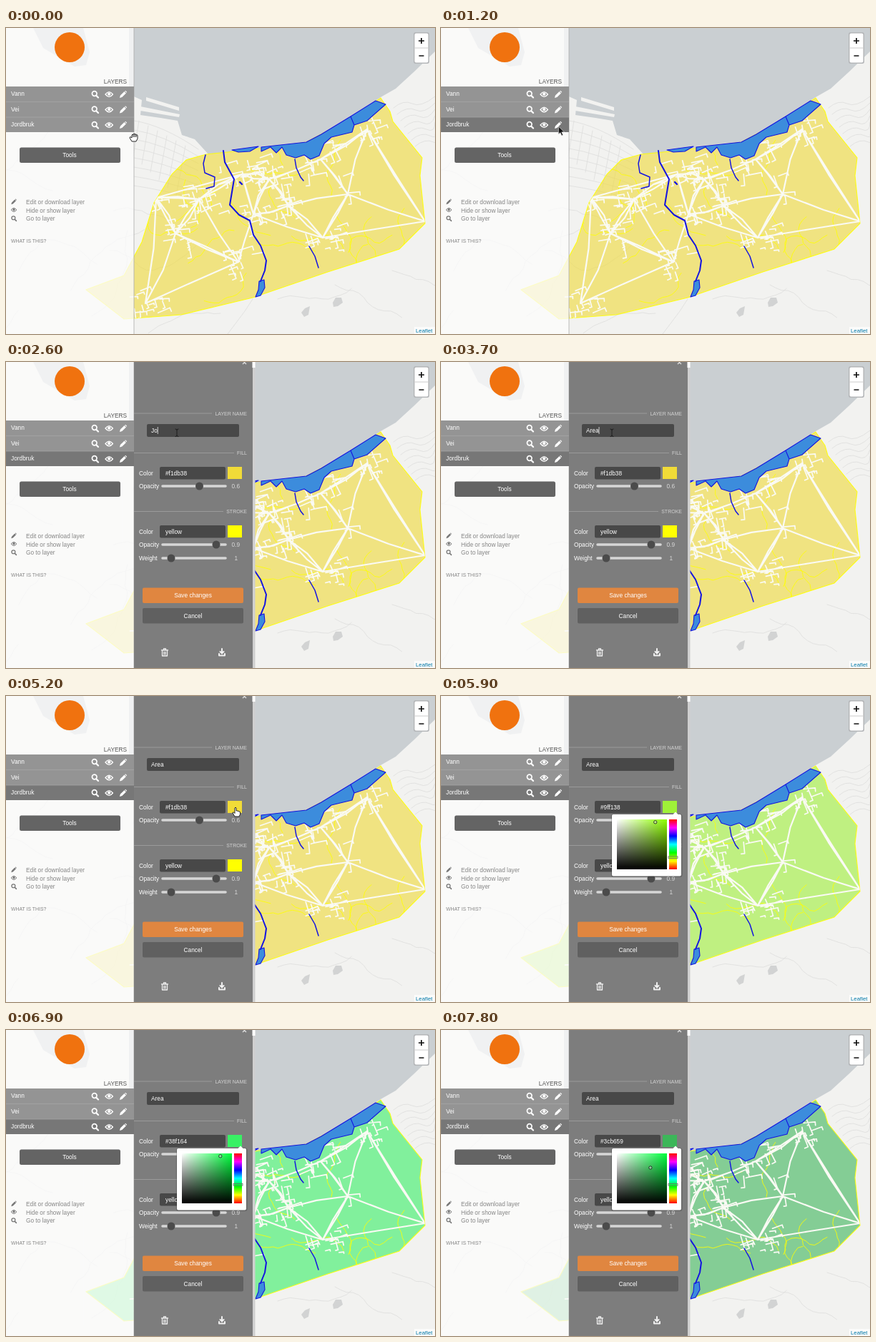
An HTML page for the animation above (8 s loop, 600 px wide and 429 px high).

```html
<!DOCTYPE html>
<html lang="en">
<head>
<meta charset="utf-8">
<title>Layer editor</title>
<style>
  html, body { margin: 0; width: 100%; height: 100%; overflow: hidden; background: #f2f2f0; }
  svg { display: block; width: 600px; height: 429px; font: 8.3px "Liberation Sans", Arial, sans-serif; }
  .line { fill: none; stroke-linejoin: round; stroke-linecap: round; }
  .white { fill: #fff; color: #fff; }
  .mid { text-anchor: middle; }
  .head { fill: #d2d2d2; font-size: 7px; text-anchor: end; }
  .field { fill: #484848; }
  .track { stroke: #d6d6d6; stroke-width: 3.6; stroke-linecap: round; }
  .knob { fill: #4b4b4b; }
  .cursor { fill: #fff; stroke: #111; stroke-width: .9; stroke-linejoin: round; }
  #arrow { fill: #111; stroke: #eee; stroke-width: .6; }
</style>
</head>
<body>
<svg viewBox="0 0 600 429">
  <defs>
    <g id="search" fill="none" stroke="currentColor" stroke-linecap="round">
      <circle cx="-.8" cy="-1" r="3.3" stroke-width="1.7"/><path d="M2 2 4.5 4.5" stroke-width="2.2"/>
    </g>
    <g id="eye">
      <path d="M-5.2 0Q0-6.6 5.2 0Q0 6.6-5.2 0Z" fill="none" stroke="currentColor" stroke-width="1.3"/>
      <circle cy="-.4" r="2.2" fill="currentColor"/>
    </g>
    <path id="pencil" fill="currentColor" d="M-5 5-4 1.6 1.6-4 4-1.6-1.6 4ZM2.3-4.6 3.2-5.3 5.2-3.3 4.6-2.3Z"/>
    <path id="areaShape" d="M524 98 537 117 541 131 582 182 579 207 586 274 550 310 450 342 345 378 245 402 165 408 112 367 165 347 190 300 207 245 232 205 252 185 280 177 340 171 420 160 480 128Z"/>
    <clipPath id="areaClip"><use href="#areaShape"/></clipPath>
    <clipPath id="panelClip"><path d="M179 0H349V429H179Z"/></clipPath>
    <linearGradient id="sat"><stop stop-color="#fff"/><stop offset="1" stop-color="#fff" stop-opacity="0"/></linearGradient>
    <linearGradient id="val" x2="0" y2="1"><stop stop-opacity="0"/><stop offset="1"/></linearGradient>
    <linearGradient id="hues" x2="0" y2="1">
      <stop stop-color="#f00"/><stop offset=".167" stop-color="#f0f"/><stop offset=".333" stop-color="#00f"/>
      <stop offset=".5" stop-color="#0ff"/><stop offset=".667" stop-color="#0f0"/><stop offset=".833" stop-color="#ff0"/><stop offset="1" stop-color="#f00"/>
    </linearGradient>
  </defs>

  <!-- base map -->
  <path fill="#f2f2f0" d="M0 0H600V429H0Z"/>
  <g fill="#cacfd2">
    <path d="M38 0 52 28 96 54 112 52 117 34 108 0Z"/>
    <path d="M172 0V93L190 101 188 122 216 126 240 130 246 150 264 156 283 177 340 171 420 160 480 128 524 97 545 85 570 62 600 33V0Z"/>
    <path fill="#d2d3d3" d="M413 399 418 393 425 390 423 402 417 405ZM457 385 461 378 469 378 471 385 464 390 458 391Z"/>
  </g>
  <path fill="#f2f2f0" d="M196 97 242 111 242 116 196 102ZM188 110 243 121 242 125 188 116Z"/>
  <g class="line" id="base" stroke="#dededc" stroke-width=".8"></g>

  <!-- vector layers -->
  <use href="#areaShape" id="area" fill-opacity=".6" stroke="#ff0" stroke-opacity=".9" stroke-width="1.1"/>
  <g class="line" clip-path="url(#areaClip)">
    <g id="plots" stroke="#ff0" stroke-opacity=".85"></g>
    <g id="lanes" stroke="#fafaf4" stroke-width="1.7"></g>
    <g id="roads" stroke="#fafaf4" stroke-width="2.2"></g>
  </g>
  <g stroke="#1414e0" stroke-width="1.1" stroke-linejoin="round">
    <path fill="#3c8cdc" d="M316 171 353 166 341 173 325 174ZM357 167 420 160 441 149 482 124 487 136 484 146 455 153 445 162 438 179 426 184 417 178 405 182 392 178 386 167 378 175 370 167 357 173ZM482 124 517 102 531 107 505 130 487 136Z"/>
    <path fill="#3c8cdc" d="M354 355 361 353 362 364 356 375 349 377 353 367Z"/>
    <g class="line">
      <path stroke-width="2" d="M304 172 306 188 319 212 313 248 326 262 341 270 346 290 356 305 364 326 362 340 356 355"/>
      <path stroke-width="1.5" d="M279 178 276 190 278 203 292 209 291 222 280 225M404 184 406 196 412 209 416 214M424 306 432 320 437 336"/>
      <path stroke-width="2.4" d="M327 216 330 219"/>
    </g>
  </g>

  <!-- map controls -->
  <rect x="570" y="6" width="22" height="44" rx="3" fill="#b4b6b8"/>
  <rect x="571.5" y="7.5" width="19" height="41" rx="2" fill="#fff"/>
  <path d="M571.5 28H590.5" stroke="#ccc"/>
  <path d="M577 18H585M581 14V22M577.5 39H584.5" stroke="#111" stroke-width="1.7"/>
  <path fill="#fff" fill-opacity=".7" d="M571 419H600V429H571Z"/>
  <text x="573" y="427" font-size="7.8" fill="#0078a8">Leaflet</text>

  <!-- sidebar -->
  <path fill="#fdfdfd" fill-opacity=".76" d="M0 0H179V429H0Z"/>
  <path stroke="#aaa" stroke-width=".8" d="M179 0V429"/>
  <circle cx="89" cy="27" r="21" fill="#f0720f"/>
  <text x="169" y="78" text-anchor="end" fill="#555">LAYERS</text>
  <path fill="#949494" d="M0 82H179V146H0Z"/>
  <path id="hover" fill="#777" d="M0 125H179V146H0Z"/>
  <path stroke="#a8a8a8" stroke-width=".7" d="M0 103.5H179M0 125H179"/>
  <g id="rows" class="white"></g>
  <rect x="19" y="167.5" width="141" height="21.5" rx="2.5" fill="#646464"/>
  <text class="white mid" x="89" y="181">Tools</text>
  <g fill="#858585" color="#777">
    <use href="#pencil" transform="translate(11 243.5)scale(.75)"/><text x="28" y="247">Edit or download layer</text>
    <use href="#eye" transform="translate(11 255)scale(.75)"/><text x="28" y="258.5">Hide or show layer</text>
    <use href="#search" transform="translate(11 267)scale(.75)"/><text x="28" y="270">Go to layer</text>
    <text x="7" y="301" font-size="6.9">WHAT IS THIS?</text>
  </g>

  <!-- edit panel -->
  <g clip-path="url(#panelClip)">
    <g id="panel">
      <path fill="#7d7d7d" d="M179 0H345V429H179Z"/>
      <path fill="#cfcfcf" d="M345 0H348.5V429H345Z"/>
      <path fill="#fff" d="M344.5 0H348.5V8H344.5Z"/>
      <path stroke="#ddd" stroke-width="1.4" d="M331-2 336 3M336-2 331 3"/>
      <path stroke="#a2a2a2" stroke-width=".8" d="M179 72H288M179 127.5H319M179 209.5H304"/>
      <g class="head"><text x="337" y="74.5">LAYER NAME</text><text x="337" y="130">FILL</text><text x="337" y="212">STROKE</text></g>
      <g class="field">
        <rect x="197" y="87" width="129" height="18" rx="2"/>
        <rect x="215" y="147" width="92" height="17.5" rx="2"/>
        <rect x="215" y="229" width="92" height="17.5" rx="2"/>
      </g>
      <rect id="swatch" x="310" y="147" width="20" height="17"/>
      <path fill="#ff0" d="M310 229H330V246H310Z"/>
      <path class="track" d="M219 174H307M219 256H307M219 275H307"/>
      <g class="knob"><circle cx="270.5" cy="174" r="5.5"/><circle cx="294" cy="256" r="5.5"/><circle cx="231" cy="275" r="5.5"/></g>
      <g class="white">
        <text id="name" x="203" y="99"></text>
        <text x="186" y="158.5">Color</text><text id="hex" x="223" y="158.5"></text>
        <text x="186" y="177">Opacity</text>
        <text x="186" y="240.5">Color</text><text x="223" y="240.5">yellow</text>
        <text x="186" y="259">Opacity</text><text x="186" y="278">Weight</text>
      </g>
      <g fill="#d8d8d8"><text x="315.5" y="177">0.6</text><text x="315.5" y="259">0.9</text><text x="319.5" y="278">1</text></g>
      <path id="caret" stroke="#ddd" stroke-width=".9" d="M0 91V101"/>
      <rect x="191" y="316.5" width="141" height="21.5" rx="2" fill="#e08640"/>
      <rect x="191" y="345" width="141" height="21.5" rx="2" fill="#606060"/>
      <g class="white mid"><text x="261.5" y="330">Save changes</text><text x="261.5" y="358.5">Cancel</text></g>
      <g class="line" stroke="#f0f0f0" stroke-width="1.3">
        <path d="M217.5 404H226.5M220.5 403.5V402H223.5V403.5M218.5 405.5V412H225.5V405.5M221 406.5V410M223 406.5V410"/>
        <path stroke-width="2" d="M302 402V408M299.5 406 302 408.5 304.5 406M298 409V411.5H306V409"/>
      </g>
      <g id="picker">
        <rect x="238" y="165.5" width="99.5" height="88.5" rx="3" opacity=".2"/>
        <rect x="239" y="166" width="97" height="86.5" rx="2" fill="#fff"/>
        <path fill="#fff" d="M324 166.5 328 162.5 332 166.5Z"/>
        <rect id="pure" x="246" y="173" width="70" height="70"/>
        <rect x="246" y="173" width="70" height="70" fill="url(#sat)"/>
        <rect x="246" y="173" width="70" height="70" fill="url(#val)"/>
        <rect x="319" y="173" width="11" height="70" fill="url(#hues)"/>
        <g id="dot" fill="none"><circle r="2.1" stroke="#222"/><circle r="1.2" stroke="#eee" stroke-width=".6"/></g>
        <rect id="bar" x="318" width="13" height="2.5" fill="none" stroke="#666" stroke-width=".8"/>
      </g>
    </g>
  </g>

  <!-- mouse cursors, each with its hot spot at 0,0 -->
  <g id="mouse">
    <path id="grab" class="cursor" d="M-3 6-6 1Q-6-1-4 0L-3 1V-3Q-2-5-1-3V-4Q0-6 1-4V-4Q3-5 3-3Q5-4 5-2V2L3 6ZM-1-3V0M1-4V0M3-3V0"/>
    <path id="arrow" class="cursor" d="M0 0V11L2.5 8.8 4.5 13 6.3 12.2 4.4 8H8Z"/>
    <path id="beam" class="line" stroke="#1c1c1c" d="M-2-5Q0-5 0-3.5Q0-5 2-5M0-4V4M-2 5.5Q0 5.5 0 4Q0 5.5 2 5.5"/>
    <path id="point" class="cursor" d="M-1 1Q0-1 1 1V5Q2 4 3 5.5Q4 4.5 5 6Q6 5.5 6.5 7V10L5 13H-1L-4 8Q-4 6.5-2.5 7L-1 8.5Z"/>
  </g>
</svg>
<script>
const $ = id => document.getElementById(id);
const show = (id, on) => { $(id).style.display = on ? "" : "none"; };
const times = (n, make) => Array.from({ length: n }, (_, i) => make(i));
const lines = (id, paths) => { $(id).innerHTML += `<path d="${paths.join("")}"/>`; };

let seed = 11;
const rnd = () => (seed = seed * 16807 % 2147483647) / 2147483647;
const spread = r => (rnd() * 2 - 1) * r;

// A path that wanders from x, y and turns a little at each step
function wander(x, y, steps, size, bend) {
  let angle = spread(Math.PI), d = `M${x} ${y}`;
  for (let i = 0; i < steps; i++) {
    angle += spread(bend);
    d += `l${Math.cos(angle) * size} ${Math.sin(angle) * size}`;
  }
  return d;
}

// Harbour streets, contours in the east, paths elsewhere
lines("base", [
  ...times(8, i => `M179 ${130 + i * 13}q40 6 90 ${40 - i * 3}`),
  ...times(6, i => `M${186 + i * 13} ${130 + i * 7}l${-8 - i} ${50 + i * 4}`),
  ...times(7, i => `M${542 + i * 5} ${112 + i * 9}q14 -12 26 -6t${32 - i * 5} -10`),
  ...times(8, i => wander(rnd() * 170, 200 + i * 28, 14, 10, .5)),
  ...times(4, i => wander(300 + i * 80, 400 - i * 20, 12, 9, .5)),
  "M345 380 334 397 310 429"
]);

// Field borders
lines("plots", times(22, i => wander(200 + i * 17 % 370, 215 + spread(85) + i % 5 * 22, 12, 7, .7)));

// Towns: x, y, reach of their side streets
const towns = [[210, 238, 8], [270, 240, 30], [330, 205, 34], [368, 212, 28], [325, 328, 24], [237, 288, 24], [195, 386, 24],
  [346, 261, 20], [395, 249, 20], [440, 184, 32], [478, 233, 5], [443, 294, 26], [505, 142, 24], [586, 271, 1]];
const far = (a, b) => Math.hypot(a[0] - b[0], a[1] - b[1]);

// Each town has a road to its three nearest neighbours
lines("roads", towns.flatMap(a => [...towns].sort((b, c) => far(a, b) - far(a, c)).slice(1, 4).map(b =>
  `M${a[0]} ${a[1]}L${(a[0] + b[0]) / 2 + spread(5)} ${(a[1] + b[1]) / 2 + spread(5)} ${b[0]} ${b[1]}`)));

lines("lanes", towns.flatMap(([x, y, reach]) => times(reach * .65, () => {
  const turn = (rnd() < .55 ? -.45 : 1.1) + rnd() * .4, size = 6 + rnd() * 13;
  const dx = Math.cos(turn) * size, dy = Math.sin(turn) * size;
  return `M${x + spread(reach)} ${y + spread(reach * .75)}l${dx} ${dy}l${-dy * .3} ${dx * .3}`;
})));

$("rows").innerHTML = ["Vann", "Vei", "Jordbruk"].map((label, i) => {
  const y = 93 + i * 21.5;
  const icons = ["search", "eye", "pencil"].map((id, k) => `<use href="#${id}" x="${124.5 + k * 19.7}" y="${y}"/>`);
  return `<text x="7" y="${y + 2}">${label}</text>${icons.join("")}`;
}).join("");

const ease = (t, from, to) => {
  const u = Math.min(1, Math.max(0, (t - from) / (to - from)));
  return u * u * (3 - 2 * u);
};

function toHex(h, s, v) {
  const part = n => {
    const k = (n + h / 60) % 6;
    return Math.round(255 * v * (1 - s * Math.max(0, Math.min(k, 4 - k, 1)))).toString(16).padStart(2, "0");
  };
  return "#" + part(5) + part(3) + part(1);
}

function nameAt(t) {
  if (t < 2800) return "Jordbruk".slice(0, 8 - Math.max(0, Math.floor((t - 2300) / 50)));
  return "Area".slice(0, Math.floor((t - 2700) / 150));
}

// Stops of the mouse: start and end of the move, target
const moves = [[600, 1300, 163.5, 137], [1700, 2200, 239, 99], [4300, 5000, 321, 156], [5400, 5600, 325, 232]];
const cursors = [[0, "grab"], [1000, "arrow"], [2200, "beam"], [4500, "arrow"], [4900, "point"], [5500, "arrow"], [5700, ""]];

function mouseAt(t) {
  return moves.reduce(([x, y], [from, to, tx, ty]) => {
    const e = ease(t, from, to);
    return [x + (tx - x) * e, y + (ty - y) * e];
  }, [179, 153]);
}

function draw(t) {
  show("hover", t >= 1000);
  show("panel", t >= 1500);
  $("panel").setAttribute("transform", `translate(${t < 1600 ? -85 : 0})`);

  $("name").textContent = nameAt(t);
  const typing = t >= 2300 && t < 3700;
  show("caret", t >= 2200 && t < 5200 && (typing || Math.floor((t - 2200) / 500) % 2 === 1));
  $("caret").setAttribute("transform", `translate(${203.5 + $("name").getComputedTextLength()})`);

  const shade = ease(t, 7000, 7600);
  const h = 52.9 + 85.3 * ease(t, 5600, 6300) - 3.9 * ease(t, 6700, 6900);
  const s = .768 - .098 * shade, v = .945 - .231 * shade, color = toHex(h, s, v);
  $("area").setAttribute("fill", color);
  $("swatch").setAttribute("fill", color);
  $("hex").textContent = color;
  show("picker", t >= 5400);
  $("pure").setAttribute("fill", toHex(h, 1, 1));
  $("dot").setAttribute("transform", `translate(${246 + 70 * s} ${243 - 70 * v})`);
  $("bar").setAttribute("y", 241.7 - 70 * h / 360);

  const kind = cursors.filter(c => c[0] <= t).pop()[1];
  for (const id of ["grab", "arrow", "beam", "point"]) show(id, id === kind);
  $("mouse").setAttribute("transform", `translate(${mouseAt(t).join(" ")})`);
}

// The screen advances in tenths of a second
function tick() {
  draw(Math.floor(performance.now() % 8000 / 100) * 100);
  requestAnimationFrame(tick);
}
tick();
</script>
</body>
</html>
```
